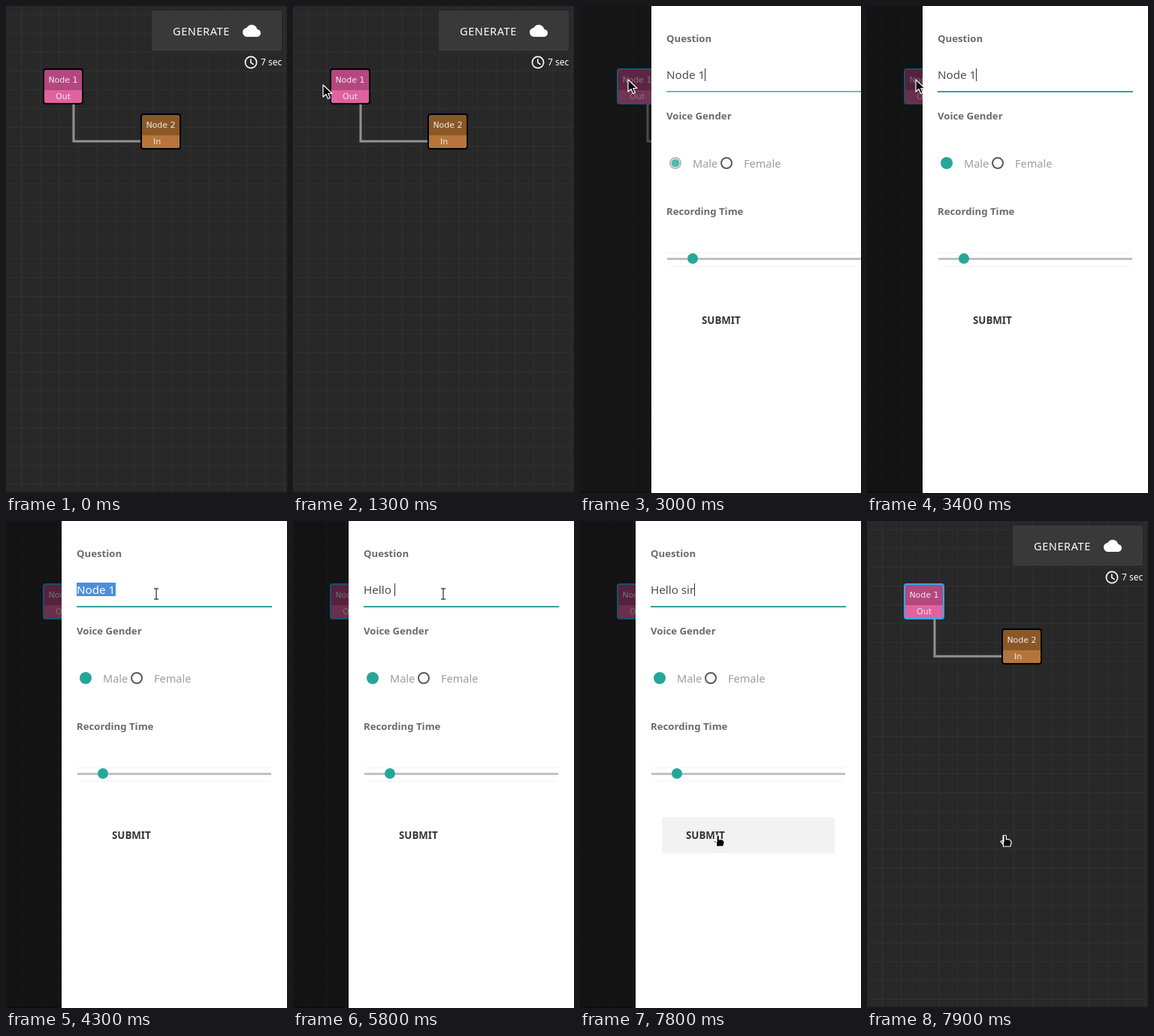
Recreate the animation shown at these times as an HTML page. Size 374 px wide and 648 px high, loop 8000 ms.

```html
<!DOCTYPE html>
<html lang="en">
<head>
<meta charset="utf-8">
<title>Node editor</title>
<style>
  html, body { margin: 0; width: 100%; height: 100%; overflow: hidden; background: #282828; }
  svg { display: block; width: 374px; height: 648px; }
  text { font-family: "Noto Sans", "Open Sans", sans-serif; white-space: pre; }
  .node text { font: 11px "DejaVu Sans", sans-serif; fill: #f0e8ec; text-anchor: middle; }
  .label { font-size: 13.2px; font-weight: 600; fill: #6b6b6b; }
  .option { font-size: 14.5px; fill: #9e9e9e; }
  #value { font-size: 15.2px; }
</style>
</head>
<body>
<svg viewBox="0 0 374 648">
  <defs>
    <pattern id="grid" x="20" y="11" width="25" height="25" patternUnits="userSpaceOnUse">
      <path d="M.5 0V25M0 .5H25" stroke="#303030"/>
    </pattern>
  </defs>
  <rect width="374" height="648" fill="#282828"/>
  <rect width="374" height="648" fill="url(#grid)"/>
  <rect y="646.5" width="374" height="1.5" fill="#21191c"/>

  <rect x="194" y="7" width="173" height="54" rx="2" fill="#202020"/>
  <rect x="194" y="6" width="173" height="54" rx="2" fill="#393939"/>
  <text x="222" y="39" font-size="14.5" letter-spacing=".6" fill="#fff">GENERATE</text>
  <path transform="translate(315 21)" fill="#fff" d="M19.35 10.04C18.67 6.59 15.64 4 12 4 9.11 4 6.6 5.64 5.35 8.04 2.34 8.36 0 10.91 0 14c0 3.31 2.69 6 6 6h13c2.76 0 5-2.24 5-5 0-2.64-2.05-4.78-4.65-4.96z"/>
  <g fill="none" stroke="#fff" stroke-width="1.6">
    <circle cx="326" cy="75" r="7.6"/>
    <path d="M325.8 70.5V75.3L329.6 77.8"/>
  </g>
  <text x="339" y="79" font-size="12" fill="#fff">7 sec</text>

  <path d="M90 130V180H180" fill="none" stroke="#929292" stroke-width="3"/>
  <g class="node" transform="translate(49 83)">
    <rect x="1" y="1" width="52" height="46" rx="3" fill="#b3487f"/>
    <rect x="2" y="29" width="50" height="17" fill="#e062a0"/>
    <rect id="outline" x="1" y="1" width="52" height="46" rx="3" fill="none" stroke-width="2"/>
    <text x="27" y="19">Node 1</text><text x="27" y="41">Out</text>
  </g>
  <g class="node" transform="translate(179 143)">
    <rect x="1" y="1" width="52" height="46" rx="3" fill="#8a5827"/>
    <rect x="2" y="29" width="50" height="17" fill="#b5753a"/>
    <rect x="1" y="1" width="52" height="46" rx="3" fill="none" stroke="#000" stroke-width="2"/>
    <text x="27" y="19">Node 2</text><text x="22" y="41">In</text>
  </g>

  <rect id="shade" width="374" height="648"/>
  <g id="panel">
    <rect width="300" height="648" fill="#fff"/>
    <text class="label" x="20" y="48">Question</text>
    <rect id="selection" x="20" y="82" width="52" height="18" fill="#4a90d9"/>
    <text id="value" x="20" y="97"></text>
    <rect id="caret" y="83" width="1" height="17" fill="#333"/>
    <rect id="underline" x="20" y="113" width="260"/>
    <text class="label" x="20" y="151">Voice Gender</text>
    <circle id="ring" cx="32" cy="209" r="7.2" fill="#fff" stroke="#a9b5b4" stroke-width="1.6"/>
    <circle id="dot" cx="32" cy="209" fill="#26a69a"/>
    <text class="option" x="55" y="215">Male</text>
    <circle cx="100" cy="209" r="7" fill="none" stroke="#5a5a5a" stroke-width="2"/>
    <text class="option" x="123" y="215">Female</text>
    <text class="label" x="20" y="278">Recording Time</text>
    <path d="M21 328.5H279M25 346.5H276" stroke="#f2f2f2"/>
    <rect x="21" y="335" width="258" height="3" fill="#c2c0c2"/>
    <circle cx="55" cy="336" r="7" fill="#26a69a"/>
    <rect id="hover" x="35" y="394" width="230" height="48" rx="2" fill="#f2f2f2"/>
    <text x="67" y="423" font-size="13.3" font-weight="600" fill="#343434">SUBMIT</text>
  </g>

  <g id="cursor" stroke-linejoin="round">
    <path id="arrow" d="M0 0V16L4 12.5 6.6 18.5 9.4 17.3 6.8 11.5H12Z" stroke="#fff" stroke-width="1.2"/>
    <path id="hand" d="M-2 1Q0-1 1.3 1V6Q3 4.5 4 6 6 5.2 6.5 7 8 7 8 9V11Q7 13 6.8 15H-2.5Q-3-12 -3 12L-6 8.5Q-5 6.5-2 8.5Z" stroke="#fff" stroke-width="1.2"/>
    <path id="fist" d="M-5 0Q-3-2-1 0 1-2 2.5 0 4.5-.5 5 1V7L3.5 10H-5L-8 6V4L-5 5Z" stroke="#fff" stroke-width="1.2"/>
    <g id="beam" fill="none">
      <path d="M-3-7H3M-3 7H3M0-7V7" stroke="#fff" stroke-width="3"/>
      <path d="M-3-7H3M-3 7H3M0-7V7" stroke="#000"/>
    </g>
  </g>
</svg>
<script>
const LOOP = 8000, STEP = 100;
const $ = id => document.getElementById(id);
const set = (id, attrs) => Object.entries(attrs).forEach(([k, v]) => $(id).setAttribute(k, v));
const show = (id, on) => set(id, { visibility: on ? "visible" : "hidden" });

// [time, x, y]
const path = [
  [100, 345, 160], [500, 235, 150], [900, 66, 110], [1300, 40, 105], [1800, 205, 165],
  [2100, 195, 160], [2600, 64, 98], [3700, 65, 98], [4200, 200, 97], [7100, 200, 97], [7700, 184, 418]
];
// [time, shape]
const shapes = [
  [100, "arrow"], [400, "hand"], [700, "arrow"], [900, "hand"], [1100, "arrow"], [1700, "hand"],
  [2200, "arrow"], [2500, "hand"], [2900, "fist"], [3000, "arrow"], [4100, "beam"],
  [7300, "arrow"], [7600, "hand"]
];
// [time, typed text]
const typing = [
  [0, "Node 1"], [4900, "H"], [5100, "He"], [5300, "Hel"], [5400, "Hell"], [5600, "Hello"],
  [5800, "Hello "], [6100, "Hello s"], [6200, "Hello si"], [6400, "Hello sir"]
];

const latest = (table, t) => (table.filter(row => row[0] <= t).pop() || [])[1];

function pointAt(t) {
  const i = path.findIndex(p => p[0] > t);
  if (i < 0) return path[path.length - 1].slice(1);
  if (i === 0) return path[0].slice(1);
  const [a, b] = [path[i - 1], path[i]];
  const u = (t - a[0]) / (b[0] - a[0]), k = u * u * (3 - 2 * u);
  return [1, 2].map(n => a[n] + (b[n] - a[n]) * k);
}

function draw(t) {
  const open = t >= 3000 && t < 7900;
  const left = Math.pow(0.07, (t - 2900) / 100);
  const selected = t >= 4200 && t < 4900;
  const opening = t < 3100;

  set("outline", { stroke: t >= 2900 ? "#2fa8e6" : "#000" });
  set("shade", { opacity: open ? 0.52 * (1 - left) : 0 });
  set("panel", { transform: `translate(${74 + 300 * left})`, display: open ? "inline" : "none" });

  if (open) {
    $("value").textContent = latest(typing, t);
    set("value", { fill: selected ? "#fff" : "#4f4f4f" });
    set("caret", { x: Math.round(20 + $("value").getComputedTextLength()) });
    set("caret", { opacity: selected ? 0 : 1 });
    set("selection", { opacity: selected ? 1 : 0 });
    set("underline", { height: opening ? 1.6 : 2, fill: opening ? "#5b9fc0" : "#37a097" });
    set("ring", { opacity: opening ? 1 : 0 });
    set("dot", { r: opening ? 5.6 : 8, opacity: opening ? 0.8 : 1 });
    set("hover", { opacity: t >= 7600 ? 1 : 0 });
  }

  const shape = latest(shapes, t);
  ["arrow", "hand", "fist", "beam"].forEach(id => show(id, id === shape));
  set("cursor", { transform: `translate(${pointAt(t).map(Math.round)})` });
}

const start = performance.now();
function tick() {
  const t = (performance.now() - start) % LOOP;
  draw(Math.floor(t / STEP) * STEP);
  requestAnimationFrame(tick);
}
tick();
</script>
</body>
</html>
```
